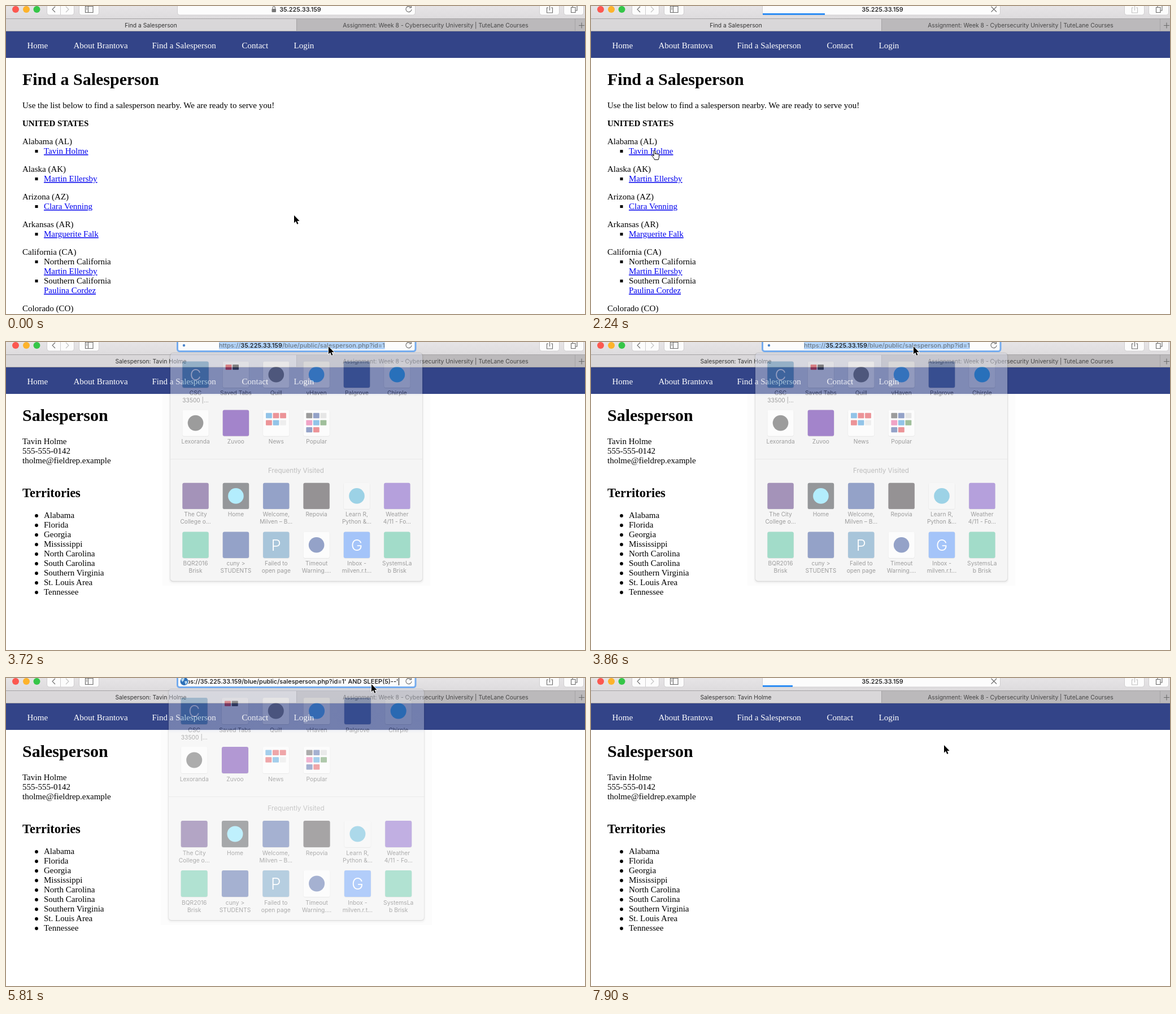
Animation, 1025 px wide and 546 px high, one loop 8000 ms. Source, as an HTML page:

```html
<!DOCTYPE html>
<html lang="en">
<head>
<meta charset="utf-8">
<title>Find a Salesperson</title>
<style>
html, body { margin: 0; width: 100%; height: 100%; overflow: hidden; background: #fff; }
svg { display: block; }
text { white-space: pre; }
.page { font: 15px "Liberation Serif", serif; }
.nav { fill: #fff; }
.h1 { font-size: 30px; font-weight: bold; }
.h2 { font-size: 22.5px; font-weight: bold; }
.bold { font-weight: bold; }
.link { fill: #00e; text-decoration: underline; }
.ui { font: 10.3px Inter, sans-serif; fill: #333; }
.mid { text-anchor: middle; }
.addr { font: 500 11px Inter, sans-serif; fill: #111; }
.line { fill: none; stroke: #6b6b6b; stroke-width: 1.1; }
</style>
</head>
<body>
<svg id="stage" width="1025" height="546" viewBox="0 0 1025 546">
  <defs>
    <linearGradient id="toolbar" x2="0" y2="1">
      <stop stop-color="#e6e4e6"/><stop offset="1" stop-color="#dddbdd"/>
    </linearGradient>
    <linearGradient id="glass" gradientUnits="userSpaceOnUse" x1="0" y1="20" x2="0" y2="429">
      <stop stop-color="#d6d9e6"/><stop offset=".06" stop-color="#d2d6e7"/>
      <stop offset=".175" stop-color="#d3d7e7"/><stop offset=".19" stop-color="#ececec"/>
    </linearGradient>
    <clipPath id="field"><path d="M323 0H702V14H323z"/></clipPath>
  </defs>

  <g id="list" class="page"></g>
  <g id="person" class="page"></g>
  <path fill="#348" d="M0 45H1025V92H0z"/>
  <g id="nav" class="page nav"></g>

  <path fill="url(#toolbar)" d="M0 0H1025V23H0z"/>
  <path fill="#d9d7d9" d="M0 23H514V44H0z"/>
  <path id="tab2" d="M515 23H1007V44H515z"/>
  <path fill="#bbb9bb" d="M1008 23H1025V44H1008z"/>
  <path stroke="#a5a3a5" d="M0 22.5H1025M0 44.5H1025M514.5 23V44M1007.5 23V44"/>
  <path class="line" d="M1014 34.5H1024M1019 29.5V39.5"/>
  <path id="close" class="line" d="M521.5 30.5l7 7m0-7l-7 7"/>
  <text id="title" class="ui mid" x="256.5" y="37.5"></text>
  <text class="ui mid" x="760.5" y="37.5" fill-opacity=".85">Assignment: Week 8 - Cybersecurity University | TuteLane Courses</text>

  <circle cx="17" cy="6" r="6" fill="#fc5850"/>
  <circle cx="36" cy="6" r="6" fill="#fdb32b"/>
  <circle cx="54.500" cy="6" r="6" fill="#35c648"/>
  <g fill="#fcfcfc" stroke="#cfcdcf">
    <rect x="72.500" y="-8" width="48" height="24" rx="4"/>
    <rect x="129.500" y="-8" width="35" height="24" rx="4"/>
    <rect x="944.500" y="-8" width="35" height="24" rx="4"/>
    <rect x="987.500" y="-8" width="35" height="24" rx="4"/>
    <rect id="box" x="303.500" y="-8" width="421" height="24" rx="4"/>
    <path d="M96.500 0V16"/>
  </g>
  <path class="line" d="M87 1l-5 5 5 5M140.500-2V11.500H154V-2M140.500 .5H154M145.500 0V11.500M142 3.500h2m-2 2.500h2"/>
  <path class="line" stroke-opacity=".4" d="M106 1l5 5-5 5"/>
  <path id="share" class="line" d="M960 3H957.500V12H967.500V3H965M962.500 8V-2"/>
  <path class="line" d="M1000.500 2.500H1008V11.500H1000.500zM1003 2V-1H1011V8H1008"/>

  <rect id="ring" x="303.500" y="-8" width="421.500" height="24.500" rx="4" fill="none" stroke="#74abee" stroke-width="3"/>
  <rect id="bar" x="304" y="13" height="2.700" fill="#1a83f5"/>
  <g id="lock"><rect x="470.500" y="5" width="7.500" height="6" rx="1" fill="#777"/><path class="line" d="M472 5V3.200a2.200 2.200 0 0 1 4.400 0V5"/></g>
  <text id="host" class="addr mid" y="10">35.225.33.159</text>
  <path id="reload" class="line" d="M716.500 2A5 5 0 1 0 718 6M717.500-1V3H713.500"/>
  <path id="stop" class="line" d="M708.500 1l9.500 9.500m0-9.500l-9.500 9.500"/>

  <g id="edit">
    <circle id="spinner" cx="315" cy="6" r="2.200" fill="#4c86cc"/>
    <g id="globe"><circle cx="315.500" cy="6" r="7" fill="#2c70b8"/><path fill="#b9d8ee" d="M310 3q3-4 6-3l-1 4-3 3zM316 6l4-1 1 3-3 4z"/></g>
    <rect id="selection" y="0" height="13" fill="#b4d5fb"/>
    <text id="url" class="addr" y="10">https://<tspan fill="#111">35.225.33.159</tspan>/blue/public/salesperson.php?id=1</text>
    <g clip-path="url(#field)"><text id="query" class="addr" x="694.500" y="10" text-anchor="end">https://35.225.33.159/blue/public/salesperson.php?id=1' AND SLEEP(5)--'</text></g>
    <path id="caret" stroke="#111" d="M.5 0V13"/>
  </g>

  <g id="popup"></g>
  <path id="arrow" stroke="#fff" stroke-width="1.600" paint-order="stroke" d="M0 0V13.500L3.100 10.600 5.300 15.800 7.500 14.900 5.300 9.900H9.600z"/>
  <path id="hand" fill="#fff" stroke="#000" d="M4 10V1.500a1.300 1.300 0 0 1 2.600 0V6.500a1.200 1.200 0 0 1 2.400.3 1.200 1.200 0 0 1 2.300.5 1.100 1.100 0 0 1 2.200.6V11c0 3-1 3-1.300 5.500H5.500C5 14 2.500 12 .8 9.500c-.8-1.300 1-2.300 2-1z"/>
</svg>
<script>
const $ = id => document.getElementById(id);
const text = (x, y, s, cls = '') => `<text x="${x}" y="${y}" class="${cls}">${s}</text>`;
const rect = (x, y, w, h, fill, rx = 0) =>
  `<rect x="${x}" y="${y}" width="${w}" height="${h}" rx="${rx}" fill="${fill}"/>`;

// Web pages
$('nav').innerHTML = [[37.5, 'Home'], [119.5, 'About Brantova'], [258.5, 'Find a Salesperson'],
  [417.5, 'Contact'], [509.5, 'Login']].map(([x, s]) => text(x, 74.5, s)).join('');

const name = 'Tavin Holme';
const states = [
  ['Alabama (AL)', '*' + name], ['Alaska (AK)', '*Martin Ellersby'],
  ['Arizona (AZ)', '*Clara Venning'], ['Arkansas (AR)', '*Marguerite Falk'],
  ['California (CA)', '-Northern California', '+Martin Ellersby', '-Southern California', '+Paulina Cordez'],
  ['Colorado (CO)']];
let html = text(29, 140, 'Find a Salesperson', 'h1') +
  text(29, 181, 'Use the list below to find a salesperson nearby. We are ready to serve you!') +
  text(29, 213, 'UNITED STATES', 'bold');
let y = 245;
for (const [state, ...items] of states) {
  html += text(29, y, state);
  for (const item of items) {
    y += 17;
    if (item[0] != '+') html += rect(51.5, y - 7, 5, 5, '#000');
    html += text(67, y, item.slice(1), item[0] == '-' ? '' : 'link');
  }
  y += 32;
}
$('list').innerHTML = html;

const areas = ['Alabama', 'Florida', 'Georgia', 'Mississippi', 'North Carolina', 'South Carolina',
  'Southern Virginia', 'St. Louis Area', 'Tennessee'];
$('person').innerHTML = text(29, 140, 'Salesperson', 'h1') + text(29, 181, name) +
  text(29, 198, '555-555-0142') + text(29, 215, 'tholme@fieldrep.example') +
  text(29, 275, 'Territories', 'h2') +
  areas.map((s, i) => `<circle cx="54" cy="${308 + i * 17}" r="2.9"/>` + text(67, 312 + i * 17, s)).join('');

// Favourites: tile colour, mark (letter, circle colour or grid of colours), label lines
const pale = '#f9f9f9', red = '#d8222a', navy = '#213f8e', blue = '#1d86d0';
const rows = [
  [35, ['#4b87b4', 'C', 'CSC', '33500 |...'], ['#e9eaf1', [red, '#222'], 'Saved Tabs'],
    [pale, '#6d6d70', 'Quill'], [pale, '#36a4f5', 'vHaven'], ['#3c5a9a', '', 'Palgrove'],
    ['#e3e6f0', '#1da1f2', 'Chirple']],
  [122, [pale, '#333', 'Lexoranda'], ['#410093', '', 'Zuvoo'],
    [pale, [blue, red, red, red, blue, '#ddd'], 'News'],
    [pale, ['#333', navy, '#ccc', '#e0408a', blue, '#3a7a30', navy, red], 'Popular']],
  [253, ['#43206f', '', 'The City', 'College o...'], ['#24282d', '#61dafb', 'Home'],
    [navy, '', 'Welcome,', 'Milven – B...'], ['#231d21', '', 'Repovia'],
    ['#f0f0f0', '#33a3cb', 'Learn R,', 'Python &amp;...'], ['#673ab7', '', 'Weather', '4/11 - Fo...']],
  [341, ['#3eb890', '', 'BQR2016', 'Brisk'], [navy, '', 'cuny &gt;', 'STUDENTS'],
    ['#4b87b4', 'P', 'Failed to', 'open page'], [pale, navy, 'Timeout', 'Warning....'],
    ['#4285f4', 'G', 'Inbox -', 'milven.r.t...'], ['#3eb890', '', 'SystemsLa', 'b Brisk']]];

function tile(x, y, [bg, mark, ...label]) {
  let s = rect(x - .5, y, 48, 48, '#0002', 4) + rect(x, y, 47, 47, bg, 3);
  if (Array.isArray(mark))
    s += mark.map((c, i) => rect(x + 5 + i % 3 * 12.7, y + 5.5 + (i / 3 | 0) * 12.7, 11, 9.5, c, 1)).join('');
  else if (mark[0] == '#') s += `<circle cx="${x + 23.5}" cy="${y + 23.5}" r="14" fill="${mark}"/>`;
  else s += `<text x="${x + 23.5}" y="${y + 34}" class="mid" font-size="28" fill="#fff" style="font-family:Inter,sans-serif;font-weight:300">${mark}</text>`;
  return s + label.map((l, i) => text(x + 23.5, y + 60.5 + i * 13, l, 'ui mid')).join('');
}
$('popup').innerHTML = rect(274, 92, 480, 346, '#00000008') +
  rect(285, 19, 458, 415, '#0000000c', 8) + rect(287, 19, 454, 412, '#0003', 6) +
  rect(288, 20, 452, 409, 'url(#glass)', 5) + rect(288, 210, 452, 1, '#cfcfcf') +
  `<text x="513.5" y="235" class="mid" style="font:11.8px Inter,sans-serif" fill="#777">Frequently Visited</text>` +
  rows.map(([y, ...tiles]) => tiles.map((d, i) => tile(309.7 + i * 72.3, y, d)).join('')).join('');

// Tracks: [start time, ...values], each held until the next entry
const cursor = [[0, 510, 371], [440, 515, 358], [590, 520, 346], [890, 532, 332], [1040, 300, 265],
  [1190, 135, 234], [1490, 121, 245], [1640, 107, 256, 1], [2540, 165, 205], [2680, 340, 115],
  [2830, 500, 52], [2980, 561, 31], [3130, 568, 16], [3270, 571, 8], [4020, 592, 10], [4160, 626, 14],
  [4310, 645, 15], [4460, 647, 11], [6410, 645, 11], [7300, 644, 20], [7450, 640, 48],
  [7600, 633, 85], [7750, 627, 110], [7900, 625, 119]];
const progress = [[0, 0, 0], [2090, 40, 1], [2240, 110, 1], [2390, 220, 1], [2540, 330, 1], [2680, 421, 1],
  [2830, 421, .8], [2980, 421, .55], [3130, 0, 0], [7300, 12, 1], [7450, 24, 1], [7600, 36, 1],
  [7750, 46, 1], [7900, 53, 1]];
const popup = [[0, 0, 1], [3570, .12, .97], [3720, .48, .987], [3870, 1, 1], [5810, .4, 1], [5960, 0, 1]];
const urlX = [[0, 366], [3720, 377], [3870, 326]];
const caret = [[0, 0], [4760, 623], [5510, 0], [5810, 695], [6410, 0], [6860, 695], [7300, 0]];

const at = (track, t) => track.findLast(k => k[0] <= t).slice(1);
const set = (id, attrs) => { for (const k in attrs) $(id).setAttribute(k, attrs[k]); };
const show = (id, on) => set(id, { opacity: +on });
const within = (t, a, b) => t >= a && t < b;

function draw(t) {
  const loaded = t >= 2390, editing = within(t, 3420, 7300), pasted = t >= 5810;
  const loading = within(t, 2090, 2680) || t >= 7300, lock = !within(t, 2090, 2390) && t < 7300;
  show('list', !loaded);
  show('person', loaded);
  $('title').textContent = loaded ? 'Salesperson: ' + name : 'Find a Salesperson';

  const hover = within(t, 2980, 3130);
  show('close', hover);
  set('tab2', { fill: hover ? '#b3b1b3' : '#bbb9bb' });
  show('share', loading ? .4 : 1);
  show('stop', loading);
  show('reload', !loading);
  show('ring', editing);
  show('edit', editing);
  show('host', !editing);
  show('lock', !editing && lock);
  set('host', { x: lock ? 521 : 516 });
  const [w, fade] = at(progress, t);
  set('bar', { width: w, opacity: fade });

  const [x] = at(urlX, t), settled = t >= 3870;
  show('spinner', !settled);
  show('globe', settled);
  show('url', !pasted);
  show('query', pasted);
  set('url', { x, style: settled ? '' : 'fill:#6b7885' });
  set('selection', { x, width: $('url').getComputedTextLength(), opacity: +(t < 4610) });
  const [cx] = at(caret, t);
  set('caret', { transform: `translate(${cx})`, opacity: +(cx > 0) });

  const [alpha, scale] = at(popup, t);
  set('popup', { opacity: alpha, transform: `translate(514) scale(${scale}) translate(-514)` });

  const [px, py, hand] = at(cursor, t);
  for (const id of ['arrow', 'hand']) set(id, { transform: `translate(${px} ${py})` });
  show('arrow', !hand);
  show('hand', !!hand);
}

const start = performance.now();
function frame() {
  draw((performance.now() - start) % 8000);
  requestAnimationFrame(frame);
}
frame();
</script>
</body>
</html>
```
